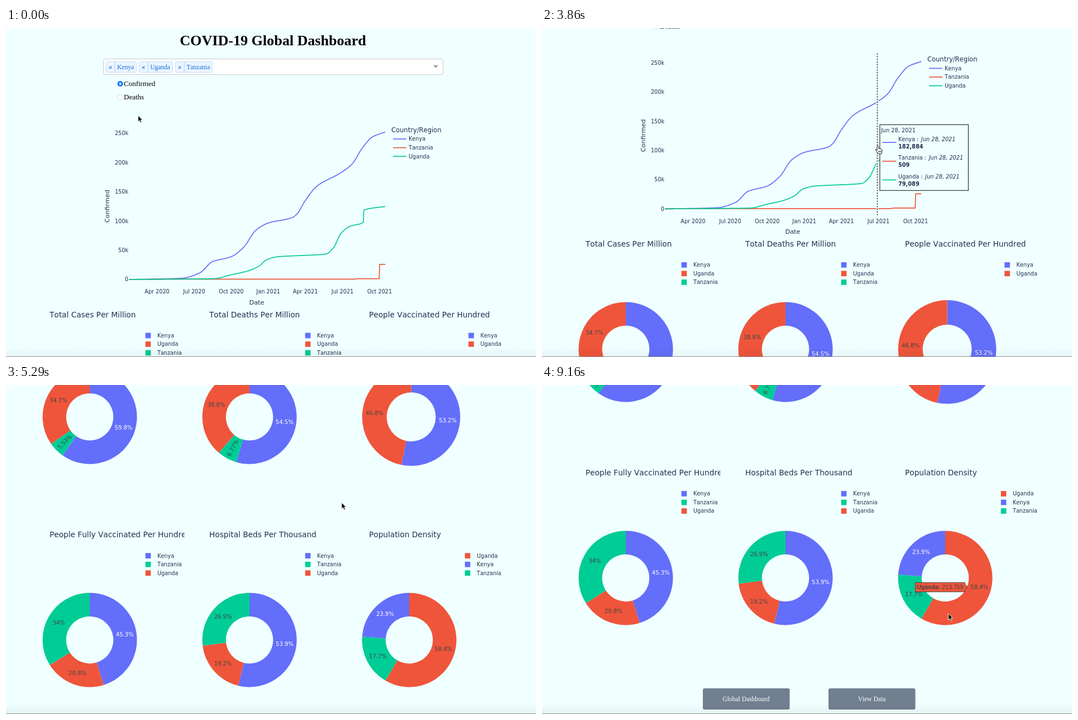
These frames come from a looping animation (949 px wide and 590 px high, 9310 ms). An HTML page:

```html
<!DOCTYPE html>
<html lang="en">
<head>
<meta charset="utf-8">
<title>COVID-19 Global Dashboard</title>
<style>
  html, body { margin: 0; width: 100%; height: 100%; overflow: hidden; background: #f0ffff; }
  svg { display: block; }
  text { font-family: "DejaVu Sans", Verdana, sans-serif; font-size: 9.7px; font-kerning: none; fill: #1f3050; white-space: pre; }
  .serif { font-family: "Liberation Serif", "Times New Roman", serif; }
  .sans { font-family: "Liberation Sans", Arial, sans-serif; }
</style>
</head>
<body>
<svg width="949" height="590" viewBox="0 0 949 590">
  <defs>
    <linearGradient id="shade" x2="0" y2="1">
      <stop offset="0" stop-color="#000" stop-opacity="0"/>
      <stop offset="1" stop-color="#000" stop-opacity=".05"/>
    </linearGradient>
  </defs>
  <g id="page">
    <g id="content"></g>
    <g id="chartHover"></g>
    <g id="pieHover"></g>
  </g>
  <rect y="572" width="949" height="18" fill="url(#shade)"/>
  <rect y="589" width="949" height="1" fill="#8d9494"/>
  <g id="cursor">
    <path id="arrow" d="M0 0V11.2L2.6 8.8L4.4 13L6.4 12.1L4.6 8H8.1Z" fill="#000" stroke="#fff" stroke-width=".9"/>
    <path id="hand" d="M-.9 8.6V1.7Q-.9 .3 .4 .3T1.7 1.7V5.6Q2.2 4.5 3.6 5.1L4 5.9Q5 5 6 6L6.2 6.7Q8 6.2 8 8V10.4Q7.8 12 6.9 13V14.6H.6V13.4Q-1.1 12-2.2 9.9L-3.8 7.6Q-4 6-2.3 6.6ZM2 9V12.2M4 9V12.2M6 9V12.2"
      fill="#fff" stroke="#222" stroke-width=".95" stroke-linejoin="round"/>
  </g>
</svg>
<script>
const LOOP = 9310, TICK = 142.9, LAST_TICK = 64;
const COLOR = { Kenya: '#636efa', Tanzania: '#ef553b', Uganda: '#00cc96' };
const PIE_COLOR = { Kenya: '#636efa', Uganda: '#ef553b', Tanzania: '#00cc96' };
const $ = id => document.getElementById(id);

// --- Motion: each gesture eases from wherever the previous one ended ---

const clamp = p => Math.min(1, Math.max(0, p));
const easeInOut = p => p * p * (3 - 2 * p);
const easeOut = p => 1 - (1 - p) ** 1.74;

function follow(start, gestures, tick) {
  return gestures.reduce((value, { from, steps, to, ease = easeInOut }) =>
    value + (to - value) * ease(clamp((tick - from + 1) / steps)), start);
}

const POINTER = [
  { from: 2, steps: 4, x: 375, y: 211 },
  { from: 8, steps: 1, x: 385, y: 211 },
  { from: 10, steps: 4, x: 448, y: 211 },
  { from: 15, steps: 8, x: 601, y: 211 },
  { from: 42, steps: 3, x: 670, y: 290 },
  { from: 50, steps: 1, x: 673.5, y: 293.5 },
  { from: 52, steps: 2, x: 662, y: 358 },
  { from: 56, steps: 2, x: 667, y: 363 },
  { from: 62, steps: 3, x: 727.5, y: 410 }
];
const SCROLL = [
  { from: 21, steps: 2, to: 7 },
  { from: 25, steps: 8, to: 385 },
  { from: 34, steps: 8, to: 756.5, ease: easeOut }
];
const along = axis => POINTER.map(move => ({ ...move, to: move[axis] }));
const PATH_X = along('x'), PATH_Y = along('y');
const pointerX = tick => follow(236.5, PATH_X, tick);
const pointerY = tick => follow(157, PATH_Y, tick);
const scrollY = tick => follow(0, SCROLL, tick);

// --- Case curves: key points of [days since 1 April 2020, thousands] ---

const FIRST_DAY = -69, LAST_DAY = 562;
const KEYS = {
  Kenya: [[FIRST_DAY, 0], [60, 2], [105, 11.3], [136, 30.3], [182, 38.9], [213, 55], [243, 84], [274, 96.7],
    [332, 105.648], [345, 112.5], [364, 134.1], [394, 160], [453, 182.884], [480, 197.5], [505, 224.5],
    [530, 243.8], [LAST_DAY, 252.4]],
  Tanzania: [[FIRST_DAY, 0], [40, .509], [483, .509], [497, 1.4], [547, 1.4], [548, 25.8], [LAST_DAY, 25.8]],
  Uganda: [[FIRST_DAY, 0], [140, 1.4], [182, 8], [222, 14.3], [250, 22.4], [270, 33.8], [299, 39.1],
    [332, 40.335], [415, 43.4], [434, 54], [453, 79.089], [474, 90.6], [508, 97.8], [509, 118.8], [LAST_DAY, 125]]
};
const COUNTRIES = Object.keys(KEYS);

// Monotone cubic through the key points
function cases(name, day) {
  const keys = KEYS[name];
  const slope = i => (keys[i + 1][1] - keys[i][1]) / (keys[i + 1][0] - keys[i][0]);
  const tangent = i => {
    if (i === 0 || i === keys.length - 1) return slope(i ? i - 1 : 0);
    const a = slope(i - 1), b = slope(i);
    return a * b > 0 ? 2 * a * b / (a + b) : 0;
  };
  const i = Math.max(0, keys.findIndex(key => key[0] >= day) - 1);
  const [d0, v0] = keys[i], [d1, v1] = keys[i + 1];
  const h = d1 - d0, u = (day - d0) / h, w = 1 - u;
  return v0 + (v1 - v0) * easeInOut(u) + h * u * w * (w * tangent(i) - u * tangent(i + 1));
}

const dayX = day => 270.5 + day * .7272;
const xDay = x => Math.round((x - 270.5) / .7272);
const caseY = thousands => 451 - thousands * 1.048;

// --- Drawing helpers ---

const MIDDLE = 'text-anchor="middle"';
const text = (x, y, s, attrs = '') => `<text x="${x}" y="${y}" dy=".35em" ${attrs}>${s}</text>`;
const rect = (x, y, w, h, attrs) => `<rect x="${x}" y="${y}" width="${w}" height="${h}" ${attrs}/>`;
const line = (x1, y1, x2, y2, color) => `<path d="M${x1} ${y1}L${x2} ${y2}" stroke="${color}" stroke-width="1.7"/>`;
const size = px => `style="font-size:${px}px"`;
const paint = (color, px) => `style="fill:${color};font-size:${px}px"`;

const ruler = document.createElement('canvas').getContext('2d');
function textWidth(s, font) {
  ruler.font = font;
  return ruler.measureText(s).width;
}

function header() {
  let x = 179;
  const tag = name => {
    const left = x, w = 24.5 + textWidth(name, '11.5px "Liberation Serif", serif');
    x += w + 4.7;
    return rect(left, 60.5, w, 19, 'rx="2" fill="#ebf5ff" stroke="#c2e0ff"') +
      line(left + 16, 60.5, left + 16, 79.5, '#c2e0ff') +
      text(left + 8, 70, '×', `class="serif" ${MIDDLE} font-weight="700" ${paint('#1670dc', 13)}`) +
      text(left + 20, 70, name, `class="serif" ${paint('#1670dc', 11.5)}`);
  };
  const option = (name, y) => text(211, y, name, `class="serif" ${paint('#000', 13)}`);
  return text(478, 22, 'COVID-19 Global Dashboard',
      `class="serif" ${MIDDLE} font-weight="700" ${paint('#000', 26.1)}`) +
    rect(174.5, 55.5, 608, 28, 'rx="3.5" fill="#fff" stroke="#ccc"') +
    ['Kenya', 'Uganda', 'Tanzania'].map(tag).join('') +
    '<path d="M765 67h9l-4.5 4.5z" fill="#999"/>' +
    '<circle cx="204.5" cy="100" r="5" fill="#0a78fa"/><circle cx="204.5" cy="100" r="1.9" fill="#fff"/>' +
    '<circle cx="204.5" cy="124" r="4.7" fill="#fff" stroke="#ccc" stroke-width=".8"/>' +
    option('Confirmed', 99.5) + option('Deaths', 123.5);
}

function curve(name) {
  let points = '';
  for (let day = FIRST_DAY; day <= LAST_DAY; day++) points += `${dayX(day)},${caseY(cases(name, day))} `;
  return `<polyline points="${points}" fill="none" stroke="${COLOR[name]}" stroke-width="1.7" stroke-linejoin="round"/>`;
}

function chart() {
  const months = ['Apr 2020', 'Jul 2020', 'Oct 2020', 'Jan 2021', 'Apr 2021', 'Jul 2021', 'Oct 2021'];
  const key = (name, i) => {
    const y = 199 + i * 15.6;
    return line(693, y, 717, y, COLOR[name]) + text(721, y, name);
  };
  return [0, 50, 100, 150, 200, 250].map(k =>
      text(219, caseY(k), k ? k + 'k' : 0, 'text-anchor="end"')).join('') +
    months.map((month, i) => text(270.5 + i * 66.4, 473, month, MIDDLE)).join('') +
    text(449, 492, 'Date', `${MIDDLE} ${size(11.3)}`) +
    text(0, 0, 'Confirmed', `${MIDDLE} transform="translate(181 319.5) rotate(-90)" ${size(11.3)}`) +
    COUNTRIES.map(curve).join('') +
    text(690, 183, 'Country/Region', size(11.5)) + COUNTRIES.map(key).join('');
}

// --- Donuts ---

// Slices clockwise from the top, with angles in degrees
function slicesOf(values) {
  const total = Object.values(values).reduce((a, b) => a + b);
  let end = 0;
  return Object.entries(values).map(([name, value]) => {
    const start = end, share = value / total;
    end += share * 360;
    return { name, value, start, end, half: (start + end) / 2, percent: +(share * 100).toPrecision(3) };
  });
}

function polar(cx, cy, radius, deg) {
  const a = deg * Math.PI / 180;
  return [cx + radius * Math.sin(a), cy - radius * Math.cos(a)];
}

function donut(cx, cy, r, values) {
  const inner = r / 2, at = (radius, deg) => polar(cx, cy, radius, deg).join(' ');
  return slicesOf(values).map(({ name, start, end, half, percent }) => {
    const large = +(end - start > 180), turn = percent < 10 ? half - 270 : 0;
    return `<path d="M${at(r, start)}A${r} ${r} 0 ${large} 1 ${at(r, end)}L${at(inner, end)}` +
      `A${inner} ${inner} 0 ${large} 0 ${at(inner, start)}Z" fill="${PIE_COLOR[name]}"/>` +
      text(0, 0, percent + '%', `${MIDDLE} transform="translate(${at(r * .75, half)}) rotate(${turn})" ` +
        paint(name === 'Kenya' ? '#fff' : '#444', 10));
  }).join('');
}

const DENSITY = { Uganda: 213.759, Tanzania: 64.699, Kenya: 87.324 };
const DENSITY_PIE = { x: 722, y: 1102.5, r: 84.5 };

// Each panel is a nested svg, so a long title is cut at its edge
function panel(col, top, title, legend, values, { r = 84.5, cx = 116.5, keyX = 221 } = {}) {
  const key = (name, i) => {
    const y = 51.5 + i * 15.5;
    return rect(keyX - 4.85, y - 4.85, 9.7, 9.7, `fill="${PIE_COLOR[name]}"`) + text(keyX + 16.5, y, name);
  };
  return `<svg x="${33.5 + col * 286}" y="${top}" width="286" height="400">` +
    text(44.5, 14, title, size(13.7)) + legend.split(' ').map(key).join('') +
    donut(cx, 202.5, r, values) + '</svg>';
}

function panels() {
  const byCases = 'Kenya Uganda Tanzania', byBeds = 'Kenya Tanzania Uganda';
  return panel(0, 500, 'Total Cases Per Million', byCases, { Kenya: 59.8, Tanzania: 5.53, Uganda: 34.7 }) +
    panel(1, 500, 'Total Deaths Per Million', byCases, { Kenya: 54.5, Tanzania: 6.77, Uganda: 38.8 }) +
    panel(2, 500, 'People Vaccinated Per Hundred', 'Kenya Uganda', { Kenya: 53.2, Uganda: 46.8 },
      { r: 87.8, cx: 120, keyX: 227.5 }) +
    panel(0, 900, 'People Fully Vaccinated Per Hundred', byBeds, { Kenya: 45.3, Uganda: 20.8, Tanzania: 34 }) +
    panel(1, 900, 'Hospital Beds Per Thousand', byBeds, { Kenya: 53.8, Uganda: 19.2, Tanzania: 26.9 }) +
    panel(2, 900, 'Population Density', 'Uganda Kenya Tanzania', DENSITY);
}

const button = (x, label) => rect(x, 1300.5, 155.5, 38, 'rx="3" fill="#708090"') +
  text(x + 77.5, 1319.5, label, `class="serif" ${MIDDLE} ${paint('#fff', 11.5)}`);

// --- Hover labels ---

function chartHover(day) {
  const x = dayX(day) + .5, left = x + 4.5;
  const values = COUNTRIES.map(name => cases(name, day));
  const top = values.reduce((sum, v) => sum + caseY(v), 0) / 3 - 59.3;
  const date = new Date(Date.UTC(2020, 3, 1 + day)).toLocaleDateString('en-US',
    { month: 'short', day: 'numeric', year: 'numeric', timeZone: 'UTC' });
  const row = (name, i) => {
    const y = top + 26 + i * 33.6;
    return line(left + 4.5, y + 5.8, left + 29.5, y + 5.8, COLOR[name]) +
      text(left + 33, y, `${name} : <tspan dx="1.6" font-style="italic">${date}</tspan>`, size(9.7)) +
      text(left + 33, y + 13, Math.round(values[i] * 1000).toLocaleString('en-US'),
        `font-weight="700" ${size(9.8)}`);
  };
  return `<path d="M${x} 172V465" stroke="#f0ffff" stroke-width="4"/>` +
    `<path d="M${x} 172V465" stroke="#222" stroke-width="1.4" stroke-dasharray="2.4"/>` +
    rect(left, top, 158.5, 118, 'fill="#f0ffff" stroke="#333" stroke-width="1.2"') +
    text(left + 2, top + 10, date, size(9.8)) + COUNTRIES.map(row).join('');
}

function pieHover(pageX, pageY) {
  const { x, y, r } = DENSITY_PIE, dx = pageX - x, dy = pageY - y, reach = Math.hypot(dx, dy);
  if (reach < r / 2 || reach > r) return '';
  const angle = (Math.atan2(dx, -dy) * 180 / Math.PI + 360) % 360;
  const { name, value, half } = slicesOf(DENSITY).find(slice => angle < slice.end);
  const [midX, midY] = polar(x, y, r * .75, half);
  const side = half < 180 ? -1 : 1;
  const tip = midX + 20.3 * side, base = tip + 5.5 * side;
  const far = base + side * (6 + textWidth(`${name}: ${value}`, 'bold 10.5px "Liberation Sans", sans-serif'));
  const [ink, weight] = name === 'Kenya' ? ['#fff', 700] : ['#444', 400];
  return `<path d="M${tip} ${midY}L${base} ${midY - 5}V${midY - 8.3}H${far}V${midY + 8.3}H${base}V${midY + 5}Z"
    fill="${PIE_COLOR[name]}" stroke="${ink}"/>` +
    text(Math.min(base, far) + 2.8, midY, `<tspan font-weight="700">${name}:</tspan> ${value}`,
      `class="sans" font-weight="${weight}" ${paint(ink, 10.5)}`);
}

// --- Playback ---

$('content').innerHTML = header() + chart() + panels() + button(288, 'Global Dashboard') + button(513, 'View Data');

const HOVER_LAG = .4;
let shown = -1;
function render() {
  const tick = Math.min(LAST_TICK, Math.floor((performance.now() % LOOP + 6) / TICK));
  if (tick !== shown) {
    shown = tick;
    const x = pointerX(tick), y = pointerY(tick), scroll = scrollY(tick);
    const entered = tick >= 3, overChart = entered && tick < 34;
    $('page').setAttribute('transform', `translate(0 ${-scroll})`);
    $('cursor').setAttribute('transform', `translate(${x} ${y})`);
    $('arrow').style.display = overChart ? 'none' : '';
    $('hand').style.display = overChart ? '' : 'none';
    $('chartHover').innerHTML = overChart ? chartHover(xDay(pointerX(tick - HOVER_LAG) - 1)) : '';
    $('pieHover').innerHTML = pieHover(x, y + scroll);
  }
  requestAnimationFrame(render);
}
render();
</script>
</body>
</html>
```
